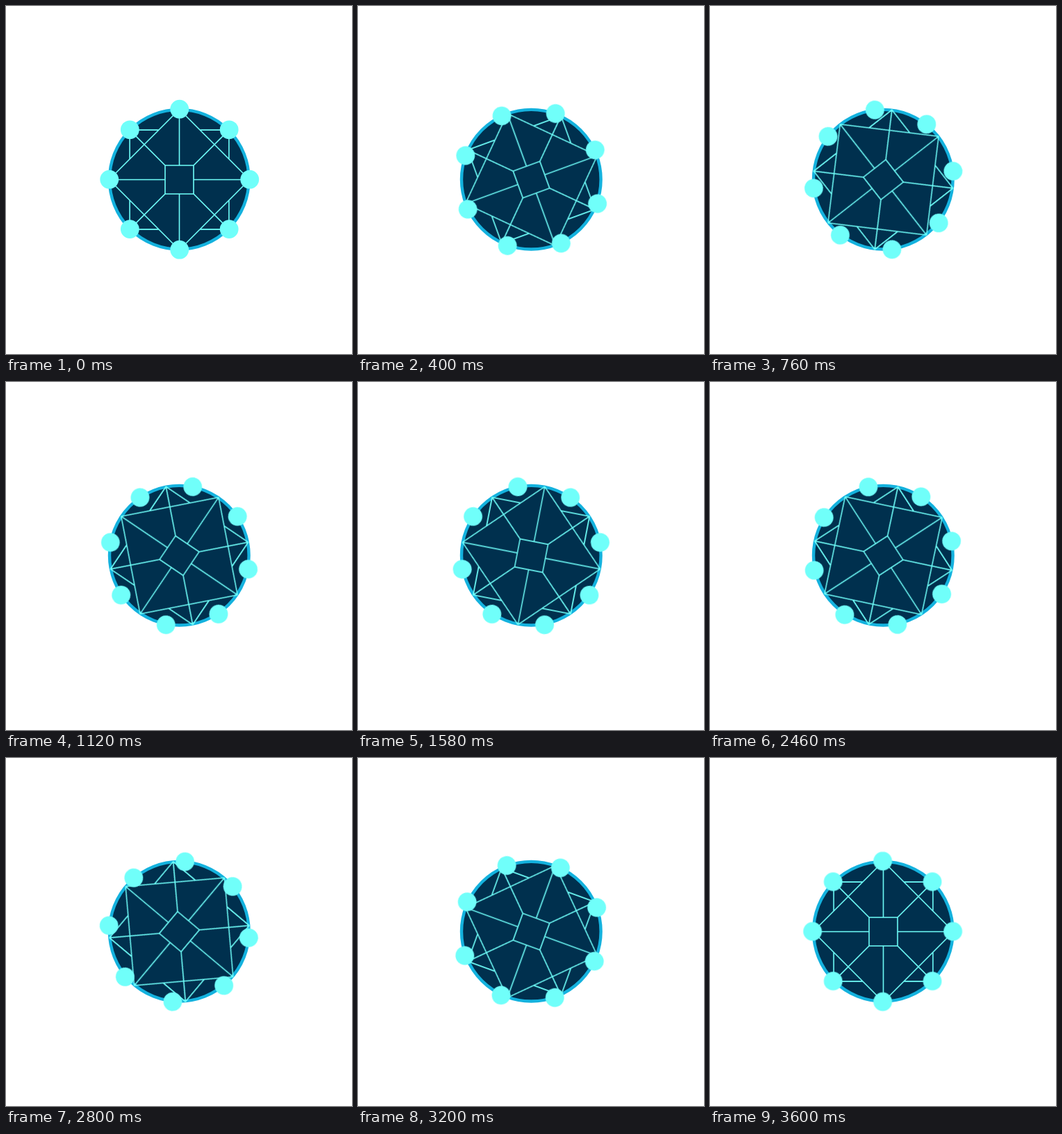
Write an HTML page that moves like this. It is 498x500 px and loops after 3.62 s.

```html
<!DOCTYPE html>
<html lang="en">
<head>
<meta charset="utf-8">
<title>Rotating network</title>
<style>
  html, body { margin: 0; width: 100%; height: 100%; overflow: hidden; background: #fff; }
  svg { display: block; width: 498px; height: 500px; }
  #web { fill: none; stroke: #70fffa; stroke-width: 1.6; transform-origin: 249.5px 249.5px; }
  #dots { fill: #70fffa; transform-origin: 249.2px 249.2px; }
</style>
</head>
<body>
<svg viewBox="0 0 498 500">
  <circle cx="249.3" cy="249.2" r="100.3" fill="#00304e" stroke="#14b2de" stroke-width="4.4"/>
  <g id="web"></g>
  <g id="dots"></g>
</svg>
<script>
const NS = 'http://www.w3.org/2000/svg';
const R = 101, HALF = 20.5, DIAG = R * Math.SQRT1_2;
const web = document.getElementById('web');
const dots = document.getElementById('dots');

function add(parent, tag, attrs) {
  const el = document.createElementNS(NS, tag);
  for (const key in attrs) el.setAttribute(key, attrs[key]);
  parent.append(el);
}

// One quarter of the web, around its own centre
const quarter = [
  `M0 ${-R}L${R} 0`,
  `M${-HALF} ${-HALF}H${HALF}`,
  `M0 ${-HALF}V${-R}`,
  `M${HALF} ${-HALF}L${DIAG} ${-DIAG}`,
  `M${R - DIAG} ${-DIAG}H${DIAG}V${DIAG - R}`
].join('');

for (let i = 0; i < 4; i++) {
  add(web, 'path', { d: quarter, transform: `translate(249.5 249.5) rotate(${i * 90})` });
}

for (let i = 0; i < 8; i++) {
  const a = i * Math.PI / 4;
  add(dots, 'circle', { cx: 249.75 + R * Math.sin(a), cy: 249.2 - R * Math.cos(a), r: 13.4 });
}

// One degree every 20 ms, in opposite directions
const STEPS = 181;
function spin(el, dir) {
  el.animate(
    { transform: ['rotate(0deg)', `rotate(${dir * STEPS}deg)`] },
    { duration: STEPS * 20, iterations: Infinity, easing: `steps(${STEPS})` }
  );
}
spin(web, -1);
spin(dots, 1);
</script>
</body>
</html>
```
